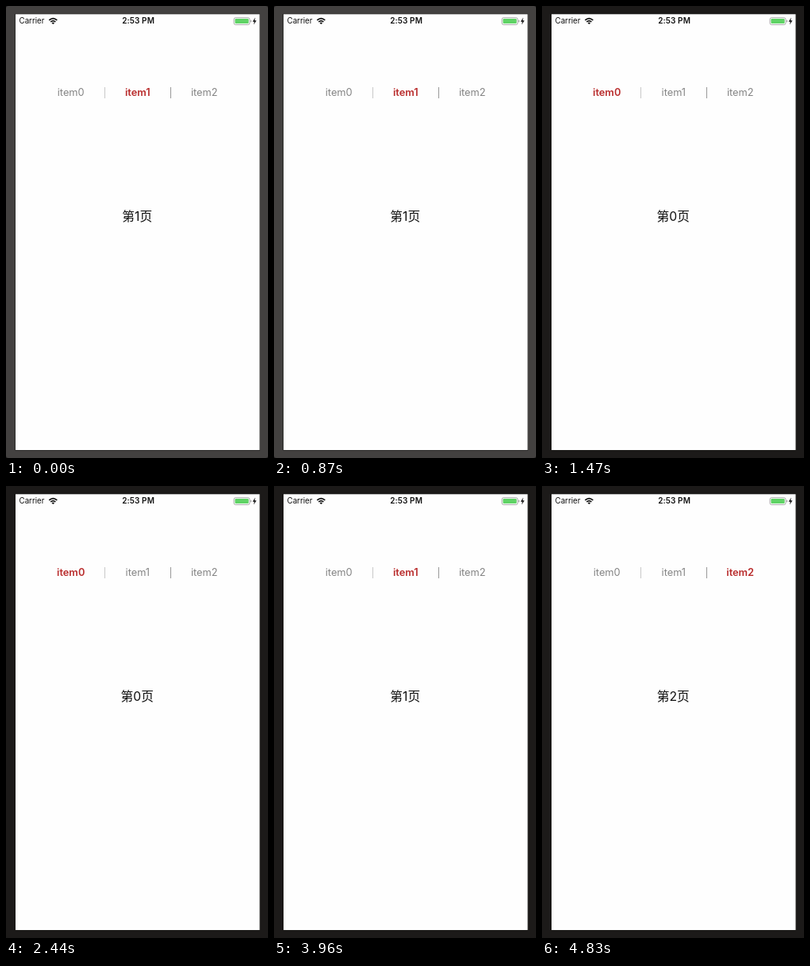
Write an HTML page that moves like this. It is 330x568 px and loops after 5.81 s.

```html
<!DOCTYPE html>
<html lang="zh-CN">
<head>
<meta charset="utf-8">
<title>Tab pages</title>
<style>
  @property --on { syntax: "<number>"; inherits: true; initial-value: 0; }

  html, body { margin: 0; width: 100%; height: 100%; overflow: hidden; background: #1c1a19; }
  svg { display: block; width: 330px; height: 568px; }
  text { font-family: Inter, "Noto Sans CJK SC", "Noto Sans CJK", sans-serif; }

  .bezel, .tab { animation: 5810ms step-end infinite; }
  .bezel { animation-name: dim; }
  .t0 { animation-name: first; }
  .t1 { animation-name: second; }
  .t2 { animation-name: third; }

  .tab text { text-anchor: middle; font-size: 12.8px; }
  .tab .off { fill: #858585; opacity: calc(1 - var(--on)); }
  .tab .on { fill: #b92d2d; font-weight: 600; opacity: var(--on); }
  .tab .page { fill: #111; font-size: 15.7px; opacity: var(--on); }
  .status { fill: #111; font-size: 9.7px; }

  @keyframes dim {
    0% { fill: #434140; }
    24.0963%, 100% { fill: #1c1a19; }
  }
  @keyframes first {
    0% { --on: 0; }
    25.3012% { --on: 1; }
    53.012%, 100% { --on: 0; }
  }
  @keyframes second {
    0% { --on: 1; }
    25.3012% { --on: 0; }
    53.012% { --on: 1; }
    78.3132%, 100% { --on: 0; }
  }
  @keyframes third {
    0% { --on: 0; }
    78.3132%, 100% { --on: 1; }
  }
</style>
</head>
<body>
<svg viewBox="0 0 330 568">
  <rect class="bezel" width="330" height="568" rx="3"/>
  <rect x="11.5" y="9.8" width="308.5" height="548.7" fill="#151413"/>
  <rect x="12" y="10.3" width="307.5" height="547.7" fill="#fefefe"/>

  <g class="status">
    <text x="16.6" y="22.4">Carrier</text>
    <text x="166.6" y="22.4" text-anchor="middle" font-size="10" font-weight="600" letter-spacing=".1">2:53 PM</text>
    <g fill="none" stroke="#111" stroke-width="1.7">
      <path d="M54.3 17.9Q59.3 13.2 64.3 17.9"/>
      <path d="M56.2 20Q59.3 17.1 62.4 20"/>
    </g>
    <path d="M57.5 21.2Q59.3 19.8 61.1 21.2L59.3 23.1Z"/>
    <rect x="287" y="14.7" width="20" height="8.8" rx="2.2" fill="none" stroke="#999" stroke-width=".8"/>
    <rect x="288.4" y="16.1" width="17.2" height="6" rx="1.1" fill="#5fd365"/>
    <path d="M308 17.6q1.2 .3 1.2 1.5t-1.2 1.5z" fill="#999"/>
    <path d="M313.9 14.6L310.6 19.7H312.8L311.9 23.5L315.5 18.2H313.2Z"/>
  </g>

  <rect x="124" y="102" width="1" height="14" fill="#c9c9c9"/>
  <rect x="207" y="102" width="1" height="14" fill="#999"/>

  <g class="tab t0">
    <text class="off" x="81.7" y="113.4">item0</text>
    <text class="on" x="81.7" y="113.4">item0</text>
    <text class="page" x="165.2" y="270.4">第0页</text>
  </g>
  <g class="tab t1">
    <text class="off" x="165.8" y="113.4">item1</text>
    <text class="on" x="165.8" y="113.4">item1</text>
    <text class="page" x="165.2" y="270.4">第1页</text>
  </g>
  <g class="tab t2">
    <text class="off" x="249.7" y="113.4">item2</text>
    <text class="on" x="249.7" y="113.4">item2</text>
    <text class="page" x="165.2" y="270.4">第2页</text>
  </g>
</svg>
</body>
</html>
```
